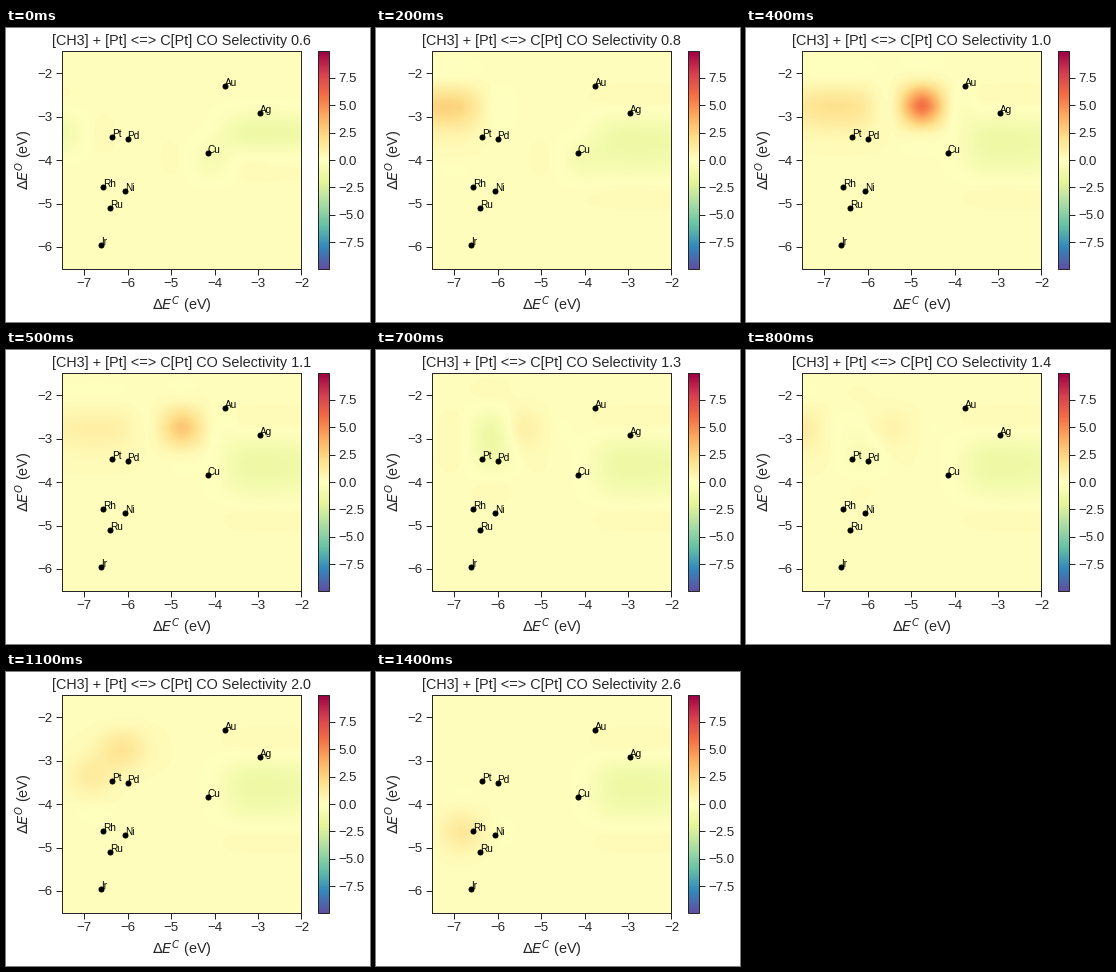
Write a matplotlib script that moves like this. It is 364 px wide and 294 px high and loops after 1.5 s.

```python
import numpy as np
import matplotlib.pyplot as plt
from matplotlib.animation import FuncAnimation

W, H, DPI = 364, 294, 72
FRAMES, STEP_MS = 15, 100
GRID = 9
C_RANGE, O_RANGE = (-7.5, -2.0), (-6.5, -1.5)
LIMIT, BASE = 9.9, 0.12
INK = "0.15"
LEFT, TOP, HEIGHT = 56.3, 23.3, 217.44

plt.rcParams.update({
    "font.family": "Liberation Sans",
    "text.color": INK,
    "axes.labelcolor": INK,
    "axes.edgecolor": INK,
    "axes.linewidth": 1,
    "axes.titlesize": 14.4,
    "axes.labelsize": 14.4,
})
for axis in ("xtick", "ytick"):
    plt.rcParams.update({
        f"{axis}.color": INK,
        f"{axis}.labelsize": 13.2,
        f"{axis}.major.size": 6,
        f"{axis}.major.width": 1,
    })

METALS = {
    "Ru": (-6.40, -5.10), "Rh": (-6.57, -4.61), "Ni": (-6.05, -4.71),
    "Ir": (-6.61, -5.95), "Pd": (-6.00, -3.52), "Pt": (-6.36, -3.48),
    "Cu": (-4.16, -3.85), "Ag": (-2.95, -2.93), "Au": (-3.75, -2.30),
}

# Short-lived spots: peak step, centre (C, O), half width, strength.
SPOTS = [
    (0, -7.5, -3.4, 0.4, -1.2),
    (1, -4.1, -4.0, 0.4, -1.5),
    (2, -7.2, -2.85, 0.7, 2.4),
    (4, -6.8, -2.85, 1.0, 1.7),
    (4, -4.75, -2.75, 0.5, 5.8),
    (7, -6.1, -3.05, 0.4, -1.5),
    (7, -5.4, -2.75, 0.4, 0.7),
    (9, -7.5, -2.85, 0.4, 2.2),
    (9, -6.0, -2.75, 0.6, 1.0),
    (11, -6.1, -2.75, 0.6, 1.5),
    (11, -6.8, -3.3, 0.6, 1.1),
    (14, -6.8, -4.65, 0.5, 1.3),
]
SPOT_LIFE = 2
C, O = np.meshgrid(np.linspace(*C_RANGE, GRID), np.linspace(*O_RANGE, GRID))


def plateau(c, o, width, height=0.5):
    """Flat-topped bump on the grid."""
    return np.exp(-((C - c) / width) ** 4 - ((O - o) / height) ** 4)


def fade(i, peak):
    return max(0, 1 - abs(i - peak) / SPOT_LIFE)


def grid_at(i):
    # A lasting basin settles downwards while the spots come and go.
    grid = BASE - 1.4 * plateau(-2.7, -3.65 + 0.3 * fade(i, 0), 1.15)
    for peak, c, o, width, strength in SPOTS:
        grid += strength * fade(i, peak) * plateau(c, o, width)
    return grid


def title_at(i):
    # The ratio climbs by 0.1 up to 1.4, then by 0.2.
    ratio = 0.6 + 0.1 * i + 0.1 * max(0, i - 8)
    return f"[CH3] + [Pt] <=> C[Pt] CO Selectivity {ratio:.1f}"


def add_axes(left, width):
    return fig.add_axes([left / W, 1 - (TOP + HEIGHT) / H,
                         width / W, HEIGHT / H])


def padded(lo, hi):
    """Range widened so that cell centres fall on its ends."""
    half = (hi - lo) / (GRID - 1) / 2
    return lo - half, hi + half


fig = plt.figure(figsize=(W / DPI, H / DPI), dpi=DPI, facecolor="white")
ax = add_axes(LEFT, HEIGHT * 1.1)
image = ax.imshow(grid_at(0), origin="lower", interpolation="spline16",
                  extent=padded(*C_RANGE) + padded(*O_RANGE), aspect="auto",
                  cmap="Spectral_r", vmin=-LIMIT, vmax=LIMIT)

for name, (c, o) in METALS.items():
    ax.plot(c, o, "o", color="black", markersize=5)
    ax.text(c, o, name, fontsize=10, color="black")

ax.set(xlim=C_RANGE, ylim=O_RANGE, xticks=range(-7, -1), yticks=range(-6, -1))
ax.set_xlabel(r"$\Delta E^C$ (eV)")
ax.set_ylabel(r"$\Delta E^O$ (eV)", labelpad=3)
title = ax.set_title(title_at(0))

bar_ax = add_axes(LEFT + 255.7, HEIGHT / 20)
fig.colorbar(image, cax=bar_ax, ticks=np.arange(-7.5, 8, 2.5))


def update(i):
    image.set_data(grid_at(i))
    title.set_text(title_at(i))
    return image, title


anim = FuncAnimation(fig, update, frames=FRAMES, interval=STEP_MS,
                     repeat=True, repeat_delay=0, blit=False)
plt.show()
```
